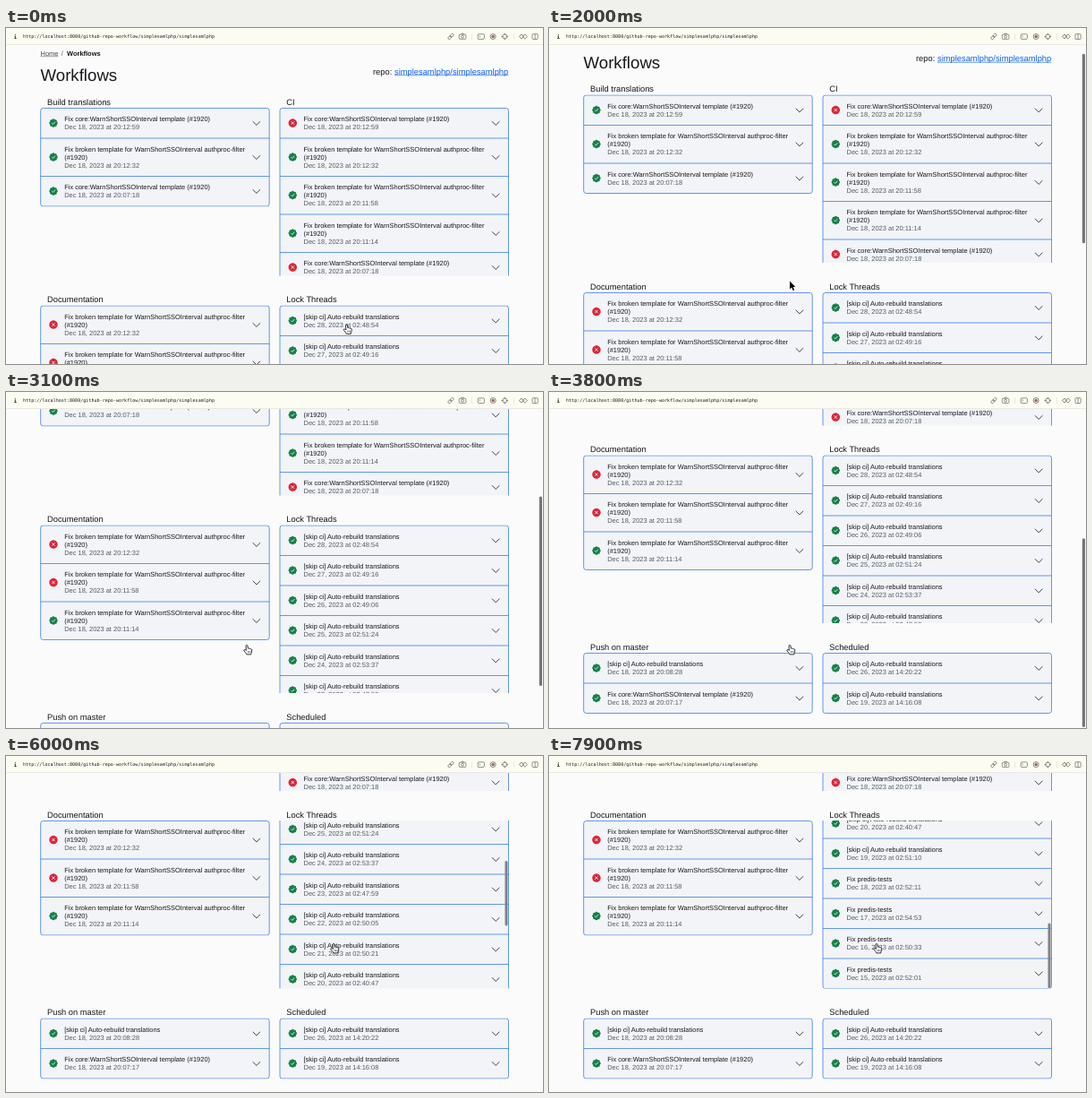
An HTML page with a canvas that plays this animation: 600x375 px, repeating every 8 s.

```html
<!DOCTYPE html>
<html lang="en">
<head>
<meta charset="utf-8">
<title>Workflows</title>
<style>
html, body { margin: 0; width: 100%; height: 100%; overflow: hidden; background: #fbfbfc; }
canvas { display: block; width: 600px; height: 375px; }
</style>
</head>
<body>
<canvas id="stage"></canvas>
<script>
const W = 600, H = 375, LOOP = 8000, STEP = 100;
const BAR = 19, LIST_H = 187, CARD_W = 255.5;
const SANS = '"Liberation Sans", Arial, sans-serif';
const MONO = '"DejaVu Sans Mono", monospace';
const BLUE = '#2f76ec', INK = '#17191c', GREY = '#565c63';

const canvas = document.getElementById('stage');
const ctx = canvas.getContext('2d');
const dpr = window.devicePixelRatio || 1;
canvas.width = W * dpr;
canvas.height = H * dpr;

// Page content: [ok, title lines, date]
const day = (d, time) => `Dec ${d}, 2023 at ${time}`;
const core = (ok, time) => ({ ok, lines: ['Fix core:WarnShortSSOInterval template (#1920)'], date: day(18, time) });
const broken = (ok, time) => ({
  ok, lines: ['Fix broken template for WarnShortSSOInterval authproc-filter', '(#1920)'], date: day(18, time)
});
const plain = (title, d, time) => ({ ok: true, lines: [title], date: day(d, time) });
const auto = (d, time) => plain('[skip ci] Auto-rebuild translations', d, time);

const lockTimes = ['02:48:54', '02:49:16', '02:49:06', '02:51:24', '02:53:37', '02:47:59', '02:50:05',
  '02:50:21', '02:40:47', '02:51:10', '02:52:11', '02:54:53', '02:50:33', '02:52:01'];
const lockRows = lockTimes.map((time, i) =>
  i < 10 ? auto(28 - i, time) : plain('Fix predis-tests', 28 - i, time));

const LEFT = 38.7, RIGHT = 306;
const cards = [
  { x: LEFT, y: 89.5, title: 'Build translations',
    rows: [core(true, '20:12:59'), broken(true, '20:12:32'), core(true, '20:07:18')] },
  { x: RIGHT, y: 89.5, title: 'CI',
    rows: [core(false, '20:12:59'), broken(true, '20:12:32'), broken(true, '20:11:58'),
      broken(true, '20:11:14'), core(false, '20:07:18')] },
  { x: LEFT, y: 310, title: 'Documentation',
    rows: [broken(false, '20:12:32'), broken(false, '20:11:58'), broken(true, '20:11:14')] },
  { x: RIGHT, y: 310, title: 'Lock Threads', rows: lockRows, inner: true },
  { x: LEFT, y: 530.5, title: 'Push on master',
    rows: [auto(18, '20:08:28'), core(true, '20:07:17')] },
  { x: RIGHT, y: 530.5, title: 'Scheduled',
    rows: [auto(26, '14:20:22'), auto(19, '14:16:08')] }
];
const rowHeight = row => row.lines.length > 1 ? 42.5 : 33.5;
const listHeight = rows => rows.reduce((sum, row) => sum + rowHeight(row), 0);

// Motion
const smooth = u => u * u * (3 - 2 * u);
function track(keys, t, ease = u => u) {
  if (t <= keys[0][0]) return keys[0][1];
  for (let i = 1; i < keys.length; i++) {
    const [t0, v0] = keys[i - 1], [t1, v1] = keys[i];
    if (t <= t1) return v0 + (v1 - v0) * ease((t - t0) / (t1 - t0));
  }
  return keys[keys.length - 1][1];
}
const pageScroll = t => track([[1700, 0], [2000, 14.5], [3100, 161], [3650, 240], [3800, 239], [4000, 237.5]], t);
const innerScroll = t => track([[5000, 0], [5200, 12], [6000, 108], [7200, 262], [7500, 282]], t);
const pageThumb = t => track([[1650, 0], [1800, 1], [4200, 1], [4450, 0]], t);
const innerThumb = t => track([[4950, 0], [5100, 1]], t);
const pointerX = t => track([[200, 380.5], [1400, 269], [4000, 269], [4800, 366]], t, smooth);
const pointerY = t => track([[200, 331], [1400, 282.5], [4000, 282.5], [4800, 209.5]], t, smooth);

// Drawing helpers
function text(str, x, y, size, color, opt = {}) {
  ctx.font = `${opt.weight || 400} ${size}px ${opt.font || SANS}`;
  ctx.fillStyle = color;
  ctx.fillText(str, x, y);
  return ctx.measureText(str).width;
}
function line(points, color, width) {
  ctx.beginPath();
  points.forEach(([x, y], i) => i ? ctx.lineTo(x, y) : ctx.moveTo(x, y));
  ctx.strokeStyle = color;
  ctx.lineWidth = width;
  ctx.stroke();
}
function linkText(str, x, y, size, color) {
  const w = text(str, x, y, size, color);
  line([[x, y + size * .12], [x + w, y + size * .12]], color, size * .07);
}
function pill(x, y, w, h, color, alpha) {
  ctx.globalAlpha = alpha;
  ctx.beginPath();
  ctx.roundRect(x, y, w, h, w / 2);
  ctx.fillStyle = color;
  ctx.fill();
  ctx.globalAlpha = 1;
}

function badge(x, y, ok) {
  ctx.beginPath();
  for (let i = 0; i <= 64; i++) {
    const a = i / 64 * Math.PI * 2;
    const r = ok ? 4.5 + .3 * Math.cos(a * 8) : 4.7;
    ctx.lineTo(x + r * Math.cos(a), y + r * Math.sin(a));
  }
  ctx.fillStyle = ok ? '#168048' : '#d9283a';
  ctx.fill();
  if (ok) {
    line([[x - 1.8, y + .1], [x - .5, y + 1.4], [x + 2, y - 1.4]], '#fff', .8);
  } else {
    line([[x - 1.6, y - 1.6], [x + 1.6, y + 1.6]], '#fff', .8);
    line([[x + 1.6, y - 1.6], [x - 1.6, y + 1.6]], '#fff', .8);
  }
}

function drawRow(row, x, y) {
  const h = rowHeight(row), mid = y + h / 2;
  badge(x + 14.3, mid - .2, row.ok);
  row.lines.forEach((str, i) => text(str, x + 26.5, y + 14.6 + i * 9, 7.48, INK));
  text(row.date, x + 26.5, y + 14.6 + row.lines.length * 9, 7.48, GREY);
  line([[x + 237, mid - 2], [x + 241.2, mid + 2.2], [x + 245.4, mid - 2]], '#2b3035', .9);
}

function drawCard(card, inner, thumb) {
  const { x, y, rows } = card;
  text(card.title, x + 7.3, y - 3.8, 9.33, INK);
  const total = listHeight(rows), shown = Math.min(total, LIST_H);
  const top = y - (card.inner ? inner : 0);
  ctx.save();
  ctx.beginPath();
  ctx.rect(x - 1, y - .5, CARD_W + 2, shown + (total > LIST_H ? .5 : 1));
  ctx.clip();
  ctx.beginPath();
  ctx.roundRect(x, top, CARD_W, total, 2.8);
  ctx.fillStyle = '#f2f4f7';
  ctx.fill();
  ctx.strokeStyle = BLUE;
  ctx.lineWidth = .75;
  ctx.stroke();
  let ry = top;
  rows.forEach((row, i) => {
    if (i) line([[x, ry], [x + CARD_W, ry]], BLUE, .75);
    drawRow(row, x, ry);
    ry += rowHeight(row);
  });
  ctx.restore();
  if (card.inner && thumb > 0) {
    pill(x + CARD_W - 4, y + 1.5 + inner / total * LIST_H, 3, LIST_H * LIST_H / total - 2, '#808285', thumb);
  }
}

function drawPage(t) {
  const scroll = pageScroll(t), inner = innerScroll(t);
  ctx.save();
  ctx.beginPath();
  ctx.rect(0, BAR, W, H - BAR);
  ctx.clip();
  ctx.translate(0, -scroll);
  linkText('Home', 38.5, 30.8, 7.48, '#4a4f55');
  text('/', 61.8, 30.8, 7.48, GREY);
  text('Workflows', 68, 30.8, 7.48, INK, { weight: 700 });
  text('Workflows', 38.5, 59.2, 18.67, INK);
  text('repo:', 410, 51.6, 9.35, INK);
  linkText('simplesamlphp/simplesamlphp', 434, 51.6, 9.35, '#0d62e8');
  cards.forEach(card => drawCard(card, inner, innerThumb(t)));
  ctx.restore();

  const view = H - BAR, full = view + 237.5;
  const y = BAR + scroll / full * view;
  const fade = pageThumb(t);
  if (fade > 0) pill(595.8, y + 1, 3.2, Math.min(view * view / full - 2, H - y - 2), '#747578', fade);
}

function circle(x, y, r, color, width = .7) {
  ctx.beginPath();
  ctx.arc(x, y, r, 0, Math.PI * 2);
  ctx.strokeStyle = color;
  ctx.lineWidth = width;
  ctx.stroke();
}
function box(x, y, w, h, color, r = .8) {
  ctx.beginPath();
  ctx.roundRect(x, y, w, h, r);
  ctx.strokeStyle = color;
  ctx.lineWidth = .7;
  ctx.stroke();
}

function drawBar() {
  const c = '#66665f', y = 9.5;
  ctx.fillStyle = '#fdfcf2';
  ctx.fillRect(0, 0, W, BAR);
  ctx.fillStyle = '#e6e5dd';
  ctx.fillRect(0, BAR - .8, W, .8);
  text('i', 8.6, 11.6, 6, '#333', { font: MONO, weight: 700 });
  text('http://localhost:8080/github-repo-workflow/simplesamlphp/simplesamlphp', 19, 11.4, 5.08, '#1c1c1c', { font: MONO });

  // chain link
  ctx.save();
  ctx.translate(497, y);
  ctx.rotate(-Math.PI / 4);
  box(-3.8, -1.4, 4.4, 2.8, c, 1.4);
  box(-.6, -1.4, 4.4, 2.8, c, 1.4);
  ctx.restore();
  // camera
  box(506.3, 7.2, 7.6, 5.2, c);
  line([[508.4, 7.2], [509, 6.2], [511.2, 6.2], [511.8, 7.2]], c, .7);
  circle(510.1, 9.8, 1.4, c);
  line([[520.5, 6], [520.5, 13]], '#dddcd3', .6);
  // console
  box(527.2, 6.8, 7.2, 5.6, c);
  line([[528.6, 8.3], [529.9, 9.3], [528.6, 10.3]], c, .6);
  // badge
  circle(544.2, y, 3, c, .8);
  ctx.beginPath();
  ctx.arc(544.2, y, 1.7, 0, Math.PI * 2);
  ctx.fillStyle = '#a0625c';
  ctx.fill();
  // crosshair
  circle(557.3, y, 2.6, c);
  [[0, 1], [1, 0], [0, -1], [-1, 0]].forEach(([dx, dy]) =>
    line([[557.3 + dx * 1.4, y + dy * 1.4], [557.3 + dx * 3.8, y + dy * 3.8]], c, .7));
  line([[567.5, 6], [567.5, 13]], '#dddcd3', .6);
  // paired diamonds
  [576, 579.8].forEach(x =>
    line([[x - 2.6, y], [x, y - 2.6], [x + 2.6, y], [x, y + 2.6], [x - 2.6, y]], c, .8));
  // split panel
  box(588, 6.7, 6.2, 5.8, c);
  line([[591.1, 6.7], [591.1, 12.5]], c, .7);
}

function drawArrow(x, y) {
  const p = new Path2D('M0 0 L0 9 L2.1 7.1 L3.6 10.6 L5.1 9.9 L3.6 6.6 L6.3 6.4 Z');
  ctx.save();
  ctx.translate(x, y);
  ctx.lineJoin = 'round';
  ctx.strokeStyle = '#fff';
  ctx.lineWidth = 1.2;
  ctx.stroke(p);
  ctx.fillStyle = '#000';
  ctx.fill(p);
  ctx.restore();
}

function drawHand(x, y) {
  const p = new Path2D('M-1 1 Q-1 0 0 0 Q.9 0 1 1 L1.4 3.7 Q2.5 3.2 3 4 Q4 3.6 4.5 4.4 ' +
    'Q5.7 4.2 5.8 5.4 L5.6 7.6 Q5.4 8.4 4.9 9 L4.8 10.4 L-.1 10.4 Q-.5 9.2 -1.6 8 ' +
    'L-3.1 6.3 Q-3.5 5.3 -2.6 5 Q-1.8 4.9 -.6 6 Z');
  ctx.save();
  ctx.translate(x, y);
  ctx.lineJoin = 'round';
  ctx.fillStyle = '#fff';
  ctx.fill(p);
  ctx.strokeStyle = '#111';
  ctx.lineWidth = .85;
  ctx.stroke(p);
  [1.3, 2.7, 4.1].forEach(dx => line([[dx, 6.6], [dx, 8.7]], '#111', .5));
  ctx.restore();
}

function drawPointer(t) {
  const x = pointerX(t), y = pointerY(t);
  const overGap = t < 4000 ? y < 310 && pageScroll(t) < 24 : x > 270 && x < RIGHT;
  (overGap ? drawArrow : drawHand)(x, y);
}

function draw(t) {
  ctx.setTransform(dpr, 0, 0, dpr, 0, 0);
  ctx.textRendering = 'geometricPrecision';
  ctx.fillStyle = '#fbfbfc';
  ctx.fillRect(0, 0, W, H);
  drawPage(t);
  drawBar();
  drawPointer(t);
}

const start = performance.now();
function tick() {
  const t = (performance.now() - start) % LOOP;
  draw(Math.floor(t / STEP) * STEP);
  requestAnimationFrame(tick);
}
tick();
</script>
</body>
</html>
```
